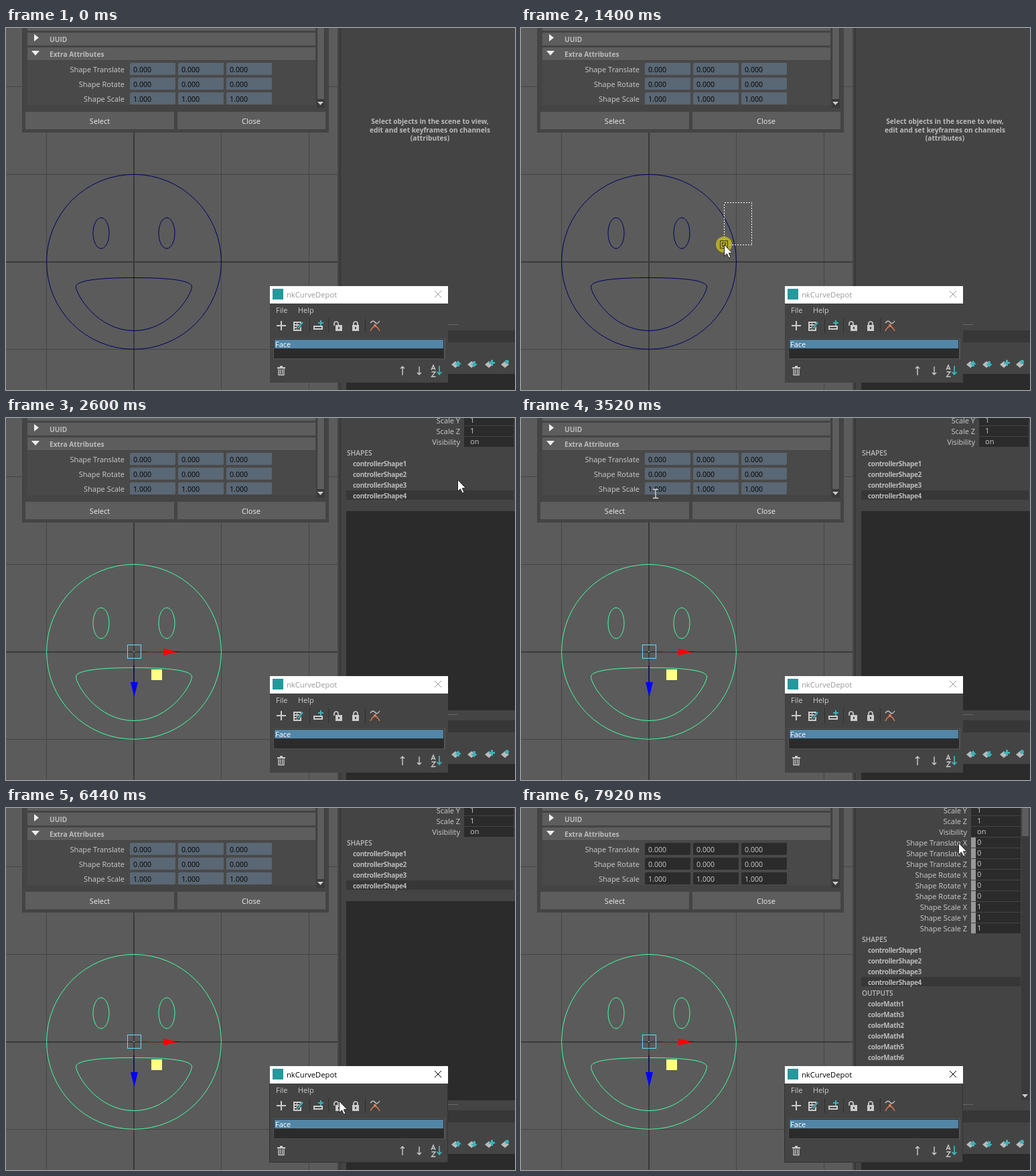
Animation of 760 by 540 pixels, one loop 8 s. Source, as an HTML page:

```html
<!DOCTYPE html>
<html lang="en">
<head>
<meta charset="utf-8">
<title>Curve depot</title>
<style>
html, body { margin: 0; width: 100%; height: 100%; overflow: hidden; background: #444; }
svg { display: block; width: 760px; height: 540px; }
text { font: 11px "Open Sans", "Noto Sans", sans-serif; fill: #ccc; white-space: pre; }
.bold { font-size: 10.2px; font-weight: 700; fill: #bbb; }
.item { font-size: 10px; letter-spacing: -.35px; }
.num { font-size: 10.6px; }
.title { font-size: 11.2px; }
.crisp { shape-rendering: crispEdges; }
</style>
</head>
<body>
<svg id="stage" viewBox="0 0 760 540" xmlns="http://www.w3.org/2000/svg"></svg>
<script>
const LOOP = 8000, STEP = 40;

const rect = (x, y, w, h, fill, extra = "") =>
  `<rect x="${x}" y="${y}" width="${w}" height="${h}" fill="${fill}" shape-rendering="crispEdges" ${extra}/>`;
const text = (x, y, s, cls = "", extra = "") => `<text x="${x}" y="${y}" class="${cls}" ${extra}>${s}</text>`;
const path = (d, stroke, fill = "none", w = 1, extra = "") =>
  `<path d="${d}" stroke="${stroke}" fill="${fill}" stroke-width="${w}" ${extra}/>`;
const group = (id, body, extra = "") => `<g id="${id}" ${extra}>${body}</g>`;
const END = 'text-anchor="end"', MID = 'text-anchor="middle"';
const DARK = "#2b2b2b", MARK = "#5d5d5d", ICON = "#ccc", TEAL = "#3fb1b8";

function viewport() {
  let s = rect(0, 0, 495, 540, "#5b5b5b");
  for (const x of [60, 321, 452]) s += rect(x, 0, 1, 540, "#454545");
  for (const y of [87, 218, 479]) s += rect(0, y, 495, 1, "#454545");
  return s + rect(190, 0, 2, 540, "#3a3a3a") + rect(0, 348, 495, 2, "#3a3a3a");
}

function face() {
  return `<g id="face" fill="none" stroke="#000066" stroke-width="1">
    <circle cx="191" cy="348.8" r="130.4"/>
    <ellipse cx="142" cy="306" rx="12" ry="23"/>
    <ellipse cx="240" cy="306" rx="12" ry="23"/>
    <path d="M104.5 386C104.5 375 150 372.5 191 372.5S277.500 375 277.500 386C277.500 397 246 451.500 191 451.500S104.500 397 104.500 386Z"/></g>`;
}

function manipulator() {
  return group("manip",
    path("M181.500 338.500h20v20h-20z", "#66d9ff", "none", 1, 'class="crisp"') +
    rect(190, 348, 2, 1, "#66d9ff") +
    rect(211, 348, 26, 1, "#f00") + path("M235 344L257 349L235 354Z", "none", "#f00") +
    rect(250, 348, 8, 1, "#600") +
    rect(190, 369, 2, 26, "#1a1a50") + path("M186 394H197L191.500 416Z", "none", "#00f") +
    rect(217, 375, 16, 16, "#ffff85"));
}

function attributeEditor() {
  let s = rect(24, 0, 458, 156, "#444") + rect(32, 49, 430, 66, "#494949");
  s += rect(32, 0, 430, 4, MARK) + rect(32, 7, 430, 19, MARK) + rect(32, 29, 430, 19, MARK);
  s += path("M42 9L49 14.500L42 20Z", "none", "#eee") + path("M38 34H50L44 41Z", "none", "#eee");
  s += text(65, 21, "UUID", "bold") + text(65, 43, "Extra Attributes", "bold");
  s += rect(464, 0, 12, 119, "#3a3a3a") + rect(465, 0, 10, 106, MARK);
  s += path("M465 110H474L469.500 115Z", "none", "#ccc");
  ["Translate", "Rotate", "Scale"].forEach((name, i) => {
    s += text(177, 65.500 + 22 * i, "Shape " + name, "", END);
  });
  s += rect(29, 125, 222, 26, MARK) + rect(256, 125, 221, 26, MARK);
  s += text(140, 143, "Select", "", MID + ' style="fill:#eee"');
  return s + text(366, 143, "Close", "", MID + ' style="fill:#eee"');
}

function fields(id, back, ink) {
  let s = "";
  for (let row = 0; row < 3; row++)
    for (let col = 0; col < 3; col++) {
      const x = 185 + 72 * col, y = 52 + 22 * row;
      s += rect(x, y, 68, 18, back, 'rx="2"');
      s += text(x + 5, y + 13.500, row < 2 ? "0.000" : "1.000", "num", `style="fill:${ink}"`);
    }
  return group(id, s);
}

function sidePanel() {
  let s = rect(495, 0, 265, 540, "#444") + rect(498, 0, 2, 540, "#373737");
  s += rect(500, 451, 260, 18, "#373737") + rect(508, 516, 252, 24, DARK);
  for (let x = 661; x < 676; x += 3) s += rect(x, 442, 1, 1, "#aaa");
  const marks = ["M673 505V502H670L675 496L680 502H677V505Z", "M697 497V501H694L699 506L704 501H701V497Z",
    "M724 495h3v3h3v3h-3v3h-3v-3h-3v-3h3z", "M745 498a3 3 0 1 0 6 0a3 3 0 1 0 -6 0z"];
  [672, 696, 722, 746].forEach((x, i) => {
    s += path(`M${x - 7} 502l6-5l6 5l-6 5z`, "none", "#bbb") + path(marks[i], "none", TEAL);
  });
  return s;
}

const hint = () => group("hint",
  ["Select objects in the scene to view,", "edit and set keyframes on channels", "(attributes)"]
    .map((line, i) => text(633, 143 + 12.700 * i, line, "bold", MID)).join(""));

function channelBox(id, wide) {
  const right = wide ? 746 : 758, label = wide ? 666 : 678;
  const rows = [["Scale Y", 1], ["Scale Z", 1], ["Visibility", "on"]];
  if (wide)
    for (const kind of ["Translate", "Rotate", "Scale"])
      for (const axis of "XYZ") rows.push([`Shape ${kind} ${axis}`, kind === "Scale" ? 1 : 0]);
  let s = "", y = 8;
  rows.forEach(([name, value], i) => {
    const x = wide ? 672 : 684;
    s += rect(x, y - 12, right - x, 15, DARK);
    if (i > 2) s += rect(672, y - 12, 7, 15, "#999");
    s += text(label, y, name, "", END) + text(wide ? 681 : 693, y - 1, value);
    y += 16;
  });
  const list = (head, name, order, lit) => {
    s += text(509, y, head, "bold", 'style="font-weight:600"');
    for (const n of order) {
      y += 16;
      if (n === lit) s += rect(508, y - 12, right - 508, 14, "#373737");
      s += text(518, y, name + n, "bold item");
    }
    y += 16;
  };
  list("SHAPES", "controllerShape", [1, 2, 3, 4], 4);
  if (wide) {
    list("OUTPUTS", "colorMath", [1, 3, 2, 4, 5, 6]);
    s += rect(747, 0, 12, 436, "#3a3a3a") + rect(748, 0, 10, 42, MARK);
    s += path("M748 427H757L752.500 432Z", "none", "#ccc");
  } else s += rect(508, 139, 252, 297, DARK);
  return group(id, s);
}

function padlock(x, open) {
  return rect(x - 5, 443, 10, 9, ICON) + rect(x - 1, 446, 2, 3, "#444") +
    path(open ? `M${x - 7} 444v-3a3 3 0 0 1 6 0v3` : `M${x - 3} 444v-3a3 3 0 0 1 6 0v3`, ICON, "none", 1.700);
}

function depotWindow() {
  let s = rect(394, 385, 266, 144, "#444");
  s += rect(394, 385, 266, 26, "#fff") + rect(398, 389, 16, 16, "#25989c");
  s += text(419, 402, "nkCurveDepot", "title", 'id="title"');
  s += path("M640 392L650 402M650 392L640 402", "#999", "none", 1, 'id="close"');
  s += text(403, 425, "File") + text(436, 425, "Help");
  s += rect(404, 443, 14, 2, ICON) + rect(410, 437, 2, 14, ICON);
  for (const x of [453, 481, 536]) s += rect(x, 433, 1, 22, "#303030");
  // edit
  s += rect(429, 438, 12, 14, ICON);
  for (const y of [440, 444, 448]) s += rect(431, y, 3, 2, "#444") + rect(435, y, 4, 2, "#444");
  s += path("M435 449L443 440", "#444", "none", 4) + path("M436 448L443 439", TEAL, "none", 2.200);
  // add to shelf
  s += rect(459, 444, 14, 6, ICON, 'rx="1"') + rect(461, 446, 10, 2, "#444");
  s += rect(466, 439, 8, 2, TEAL) + rect(469, 436, 2, 8, TEAL);
  s += padlock(497, true) + padlock(522, false);
  // curve
  s += path("M544 440Q548 435 551 439T558 437", ICON, "none", 1.300) +
    path("M544 452Q551 438 558 452", "#e07850", "none", 1.400) + rect(549, 442, 4, 3, "#e07850");
  // list
  s += rect(398.500, 463, 257, 31, "#555") + rect(400, 464, 254, 29, DARK);
  s += rect(401, 465, 252, 13, "#5285a6") + text(402, 476, "Face", "", 'style="fill:#fff"');
  // trash
  s += rect(405, 506, 12, 1.500, ICON) + rect(409, 504, 4, 2, ICON) +
    path("M407 508.500V517.500H415V508.500M409.500 509V516M412.500 509V516", ICON, "none", 1.300);
  s += path("M592 518V505M589 508L592 505L595 508", ICON, "none", 1.400);
  s += path("M617 505V517M614 514L617 517L620 514", ICON, "none", 1.400);
  s += path("M635 510L638 503L641 510M636 508H640M635.500 513H641L635.500 520H641.500", ICON, "none", 1.300);
  s += path("M647 504V516M643.500 513L647 517L650.500 513", TEAL, "none", 1.800);
  s += path("M393.500 411V528.500H659.500V411", "#333", "none", 1, 'id="edge"');
  return s;
}

const tooltip = () => group("tip", rect(499, 455, 131, 18, "#222") +
  rect(500, 456, 129, 16, "#ffffdc") + text(503, 468, "Unlock shape attributes", "", 'style="fill:#000"'));

function pointer() {
  return group("cursor",
    group("press", `<circle r="12" fill="#c8be1e" fill-opacity=".8"/>`) +
    group("pick", path("M-5.500 -5.500h11v11h-11zM-2.500 -2.500h5v5h-5z", "#3c3a10", "none", 1, 'class="crisp"')) +
    group("arrow", path("M.500 0V17.500L4.500 13.800L7.300 20L10 18.800L7.300 12.800H12.500Z", "#222", "#fff")) +
    group("beam", path("M-4 -6.500H-1L0 -6L1 -6.500H4M0 -6V6M-4 6.500H-1L0 6L1 6.500H4", "#e0e0e0", "none", 1.300)));
}

document.getElementById("stage").innerHTML =
  viewport() + face() + manipulator() + attributeEditor() +
  fields("locked", "#5a6774", "#000") + fields("free", DARK, "#ccc") +
  sidePanel() + hint() + channelBox("short", false) + channelBox("full", true) +
  depotWindow() + tooltip() +
  '<rect id="marquee" fill="none" stroke="#fff" stroke-dasharray="2 2" class="crisp"/>' + pointer();

const el = id => document.getElementById(id);
const show = (id, on) => { el(id).style.display = on ? "" : "none"; };

// time, x, y of the pointer tip
const route = [
  [400, 454, 409], [440, 432, 368], [520, 404, 322], [640, 404, 322], [680, 399, 314], [800, 354, 267],
  [880, 344, 260], [960, 344, 260], [1320, 305, 320], [1400, 303, 323], [1520, 303, 323],
  [1600, 320, 315], [1800, 438, 263], [1960, 438, 263], [2160, 590, 90], [2320, 676, 17],
  [2440, 680, 55], [2600, 674, 92], [2800, 651, 55], [2840, 651, 55], [3120, 370, 66],
  [3360, 157, 80], [3520, 201, 113], [3640, 198, 62], [3680, 198, 62], [3840, 270, 44],
  [4160, 430, 190], [4400, 493, 365], [4520, 499, 392], [4560, 499, 392], [4760, 496, 433],
  [4880, 497, 437], [6680, 497, 437], [6720, 496, 435], [6800, 497, 436], [7160, 497, 436],
  [7320, 555, 330], [7520, 640, 110], [7680, 669, 17], [7800, 664, 36], [7920, 653, 52]
];

function locate(t) {
  const i = route.findIndex(p => p[0] > t);
  if (i < 0) return route[route.length - 1].slice(1);
  if (i === 0) return route[0].slice(1);
  const [t0, x0, y0] = route[i - 1], [t1, x1, y1] = route[i];
  const k = (t - t0) / (t1 - t0);
  return [Math.round(x0 + (x1 - x0) * k), Math.round(y0 + (y1 - y0) * k)];
}

function draw(t) {
  const [x, y] = locate(t);
  const picked = t >= 1600, active = t >= 6320, unlocked = t >= 6520;
  const dragging = t >= 920 && t < 1520;
  const beam = x > 184 && x < 397 && y > 51 && y < 115;

  el("face").setAttribute("stroke", picked ? "#43ffa3" : "#000066");
  show("manip", picked);
  show("hint", !picked);
  show("short", picked && !unlocked);
  show("full", unlocked);
  show("locked", !unlocked);
  show("free", unlocked);
  el("title").style.fill = active ? "#000" : "#999";
  el("close").setAttribute("stroke", active ? "#000" : "#999");
  show("edge", active);
  show("tip", t >= 5600 && t < 6320);

  const box = el("marquee");
  show("marquee", dragging);
  box.setAttribute("x", x + .5);
  box.setAttribute("y", 260.5);
  box.setAttribute("width", Math.max(0, 344 - x));
  box.setAttribute("height", Math.max(0, y - 260));

  show("cursor", t >= 400);
  el("cursor").setAttribute("transform", `translate(${x} ${y})`);
  show("press", dragging || (t >= 6320 && t < 6440));
  show("pick", dragging);
  show("arrow", !beam);
  show("beam", beam);
}

const start = performance.now();
function tick() {
  const t = (performance.now() - start) % LOOP;
  draw(Math.floor(t / STEP) * STEP);
  requestAnimationFrame(tick);
}
tick();
</script>
</body>
</html>
```
